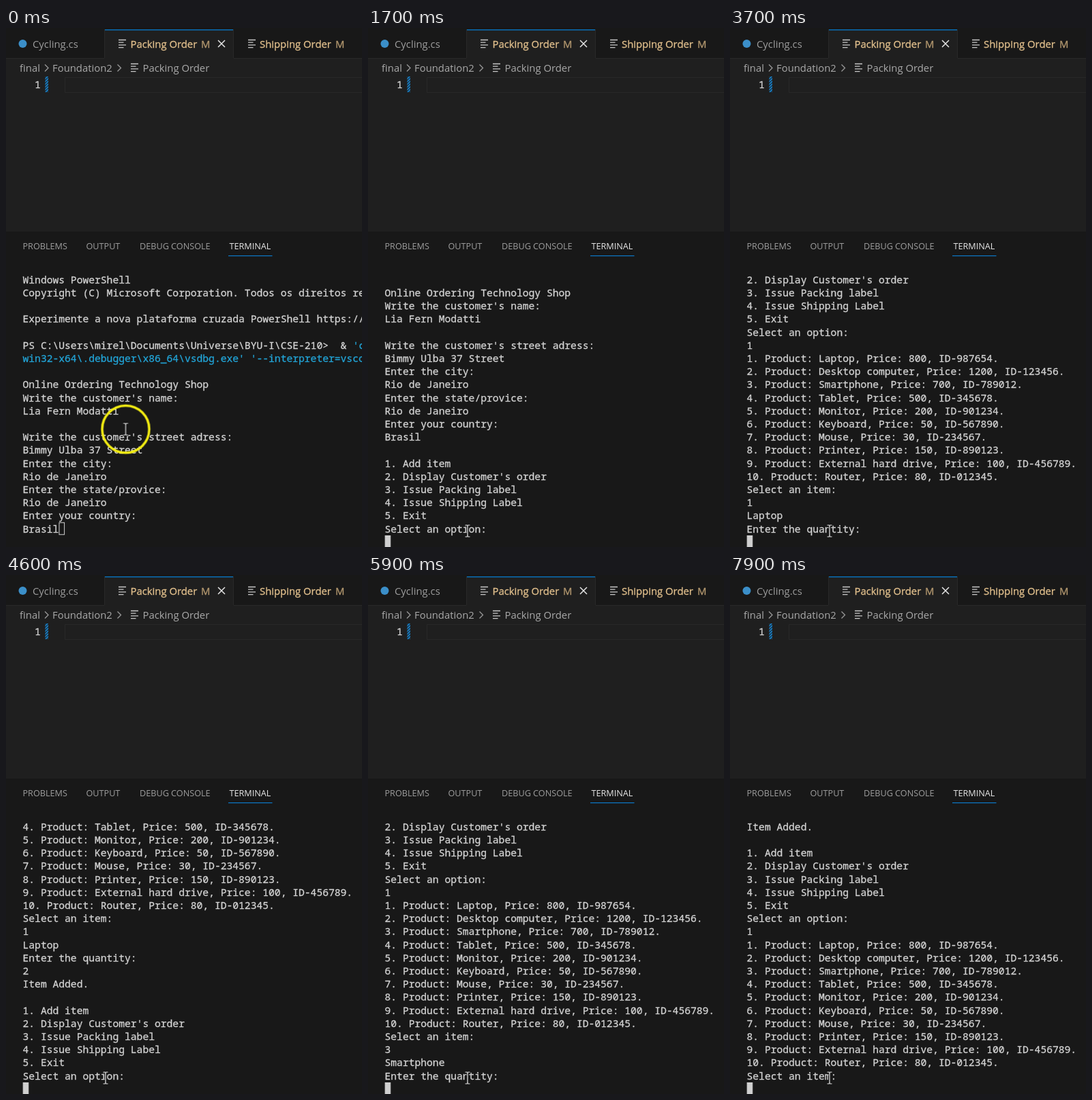
Animation of 522 by 760 pixels, one loop 8000 ms. Source, as an HTML page:

```html
<!DOCTYPE html>
<html lang="en">
<head>
<meta charset="utf-8">
<title>Order terminal</title>
<style>
  html, body { margin: 0; width: 100%; height: 100%; overflow: hidden; background: #181818; }
  svg { display: block; width: 522px; height: 760px; }
  text { white-space: pre; stroke-width: 0.3; }
  .ui { font: 14.85px "Open Sans", "Noto Sans", sans-serif; }
  .panel { font: 12.65px "Open Sans", "Noto Sans", sans-serif; fill: #9d9d9d; }
  .mono { font: 14.667px "Noto Sans Mono", "DejaVu Sans Mono", monospace; fill: #d4d4d4; stroke: #d4d4d4; }
  .dim { fill: #9d9d9d; }
  .crumb { fill: #a9a9a9; }
  .active { fill: #e7e7e7; }
  .changed { fill: #e2c08d; stroke: #e2c08d; }
  .mark { fill: #b3986f; stroke: #b3986f; }
  .command { fill: #22a5d8; stroke: #22a5d8; }
  .line { fill: none; stroke: #c8c8c8; stroke-width: 1.3; }

  #pointer, #ring, #click { animation: 8s infinite; }
  #pointer { animation-name: move; }
  #ring { animation-name: ring; animation-timing-function: step-end; }
  #click { animation-name: click; animation-timing-function: step-end; }
  @keyframes move {
    0%, 1% { transform: translate(175.5px, 587.5px); animation-timing-function: ease-in-out; }
    6.5%, 100% { transform: translate(146px, 736.5px); }
  }
  @keyframes ring { 0% { opacity: 1; } 5.5%, 100% { opacity: 0; } }
  @keyframes click { 0% { opacity: 0; } 7.2% { opacity: 1; } 9.9%, 100% { opacity: 0; } }
</style>
</head>
<body>
<svg viewBox="0 0 522 760">
  <defs>
    <g id="file" class="line"><path d="M0 0H11M0 3.7H7.5M0 7.4H11M0 11.1H7.5"/></g>
    <pattern id="hatch" width="4" height="4" patternUnits="userSpaceOnUse">
      <path d="M-1 5L5 -1M-1 1L1 -1M3 5L5 3" stroke="#1583d0" stroke-width="1.7"/>
    </pattern>
  </defs>

  <rect width="522" height="760" fill="#181818"/>
  <rect y="44" width="522" height="254" fill="#1f1f1f"/>
  <rect x="145" y="2" width="188" height="43" fill="#1f1f1f"/>
  <path d="M144.5 2V44M333.5 2V44M0 44.5H144M334 44.5H522" stroke="#292929"/>
  <rect x="145" y="2" width="188" height="1.4" fill="#0873c0"/>

  <circle cx="24.5" cy="23" r="6" fill="#3b8fc9"/>
  <g class="ui">
    <text class="dim" x="39" y="29">Cycling.cs</text>
    <text class="changed" x="182.5" y="29">Packing Order</text>
    <text class="mark" x="286" y="29">M</text>
    <text class="changed" x="372" y="29">Shipping Order</text>
    <text class="mark" x="483" y="29">M</text>
    <g class="crumb">
      <text x="20" y="63.5">final</text>
      <text x="68" y="63.5">Foundation2</text>
      <text x="200.5" y="63.5">Packing Order</text>
    </g>
  </g>
  <use href="#file" x="165" y="17.5"/>
  <use href="#file" x="355" y="17.5"/>
  <use href="#file" x="183" y="52.5"/>
  <path class="line" d="M311 18L321 28M321 18L311 28" style="stroke:#e4e4e4;stroke-width:1.5"/>
  <path class="line" d="M57 53.5L62 58.5L57 63.5M163.5 53.5L168.5 58.5L163.5 63.5" style="stroke:#999"/>

  <path d="M522 72.5H86.5V94.5H522" fill="none" stroke="#282828"/>
  <text class="mono" x="42" y="88">1</text>
  <rect x="57.5" y="71" width="4.5" height="23" fill="url(#hatch)"/>

  <g class="panel">
    <text x="24.5" y="323.5">PROBLEMS</text>
    <text x="117.5" y="323.5">OUTPUT</text>
    <text x="196" y="323.5">DEBUG CONSOLE</text>
    <text class="active" x="327.5" y="323.5">TERMINAL</text>
  </g>
  <rect x="326" y="333" width="64.5" height="1.2" fill="#0b78c8"/>

  <g id="rows" class="mono"></g>
  <rect id="caret" width="7.6" height="17.5" stroke="#d0d0d0"/>

  <g id="pointer">
    <circle id="ring" r="34.5" fill="none" stroke="#f4ee12" stroke-width="3.5"/>
    <circle id="click" r="8" fill="none" stroke="#1673c4" stroke-width="3" stroke-dasharray="17 8.13" stroke-dashoffset="-4.07"/>
    <g fill="none">
      <path d="M-4 -8.5H-1L0 -7.5L1 -8.5H4M0 -7.5V7.5M-4 8.5H-1L0 7.5L1 8.5H4" stroke="#111" stroke-width="3"/>
      <path d="M-3.5 -8.5H-1L0 -7.5L1 -8.5H3.5M0 -7.5V7.5M-3.5 8.5H-1L0 7.5L1 8.5H3.5" stroke="#eee" stroke-width="1.2"/>
    </g>
  </g>
</svg>

<script>
const LOOP = 8000, ROWS = 21, LEFT = 24.5, TOP = 373.8, ROW = 19.2, CELL = 8.8;
const rows = document.getElementById('rows');
const caret = document.getElementById('caret');

// "~" switches the rest of a row to the command colour
const intro = String.raw`Windows PowerShell
Copyright (C) Microsoft Corporation. Todos os direitos reservados.

Experimente a nova plataforma cruzada PowerShell https://aka.ms/pscore6

PS C:\Users\mirel\Documents\Universe\BYU-I\CSE-210>  & ~'c:\Users\mirel
~win32-x64\.debugger\x86_64\vsdbg.exe' '--interpreter=vscode'

Online Ordering Technology Shop
Write the customer's name:
Lia Fern Modatti

Write the customer's street adress:
Bimmy Ulba 37 Street
Enter the city:
Rio de Janeiro
Enter the state/provice:
Rio de Janeiro
Enter your country:
Brasil`;

const menu = `

1. Add item
2. Display Customer's order
3. Issue Packing label
4. Issue Shipping Label
5. Exit
Select an option:
`;

const products = [
  ['Laptop', 800, '987654'], ['Desktop computer', 1200, '123456'],
  ['Smartphone', 700, '789012'], ['Tablet', 500, '345678'],
  ['Monitor', 200, '901234'], ['Keyboard', 50, '567890'],
  ['Mouse', 30, '234567'], ['Printer', 150, '890123'],
  ['External hard drive', 100, '456789'], ['Router', 80, '012345']
];
const list = '\n' + products.map(([name, price, id], i) =>
  `${i + 1}. Product: ${name}, Price: ${price}, ID-${id}.\n`).join('') + 'Select an item:\n';
const quantity = name => `\n${name}\nEnter the quantity:\n`;
const added = '\nItem Added.' + menu;

// Output and key presses: [time in ms, text appended]
const events = [
  [0, intro], [1300, menu],
  [2190, '1'], [2590, list], [3390, '1'], [3590, quantity('Laptop')], [3890, '2'], [4580, added],
  [4990, '1'], [5190, list], [5490, '3'], [5790, quantity('Smartphone')], [6090, '5'], [6480, added],
  [6790, '1'], [7090, list]
];
const FOCUS = 800;

function addText(str, x, y, cls) {
  const el = document.createElementNS('http://www.w3.org/2000/svg', 'text');
  el.setAttribute('x', x);
  el.setAttribute('y', y);
  if (cls) el.setAttribute('class', cls);
  el.textContent = str;
  rows.append(el);
}

function draw(count) {
  const screen = events.slice(0, count).map(e => e[1]).join('').split('\n').slice(-ROWS);
  rows.replaceChildren();
  screen.forEach((line, i) => {
    const [plain, command] = line.split('~');
    const y = TOP + i * ROW;
    if (plain) addText(plain, LEFT, y);
    if (command) addText(command, LEFT + plain.length * CELL, y, 'command');
  });
  const last = screen.length - 1;
  caret.setAttribute('x', LEFT + screen[last].length * CELL + 0.7);
  caret.setAttribute('y', TOP + last * ROW - 14.3);
}

let shown = 0;
function tick(now) {
  const t = now % LOOP;
  const count = events.filter(e => e[0] <= t).length;
  if (count !== shown) draw(shown = count);
  caret.setAttribute('fill', t < FOCUS ? 'none' : '#d0d0d0');
  requestAnimationFrame(tick);
}
tick(0);
</script>
</body>
</html>
```
